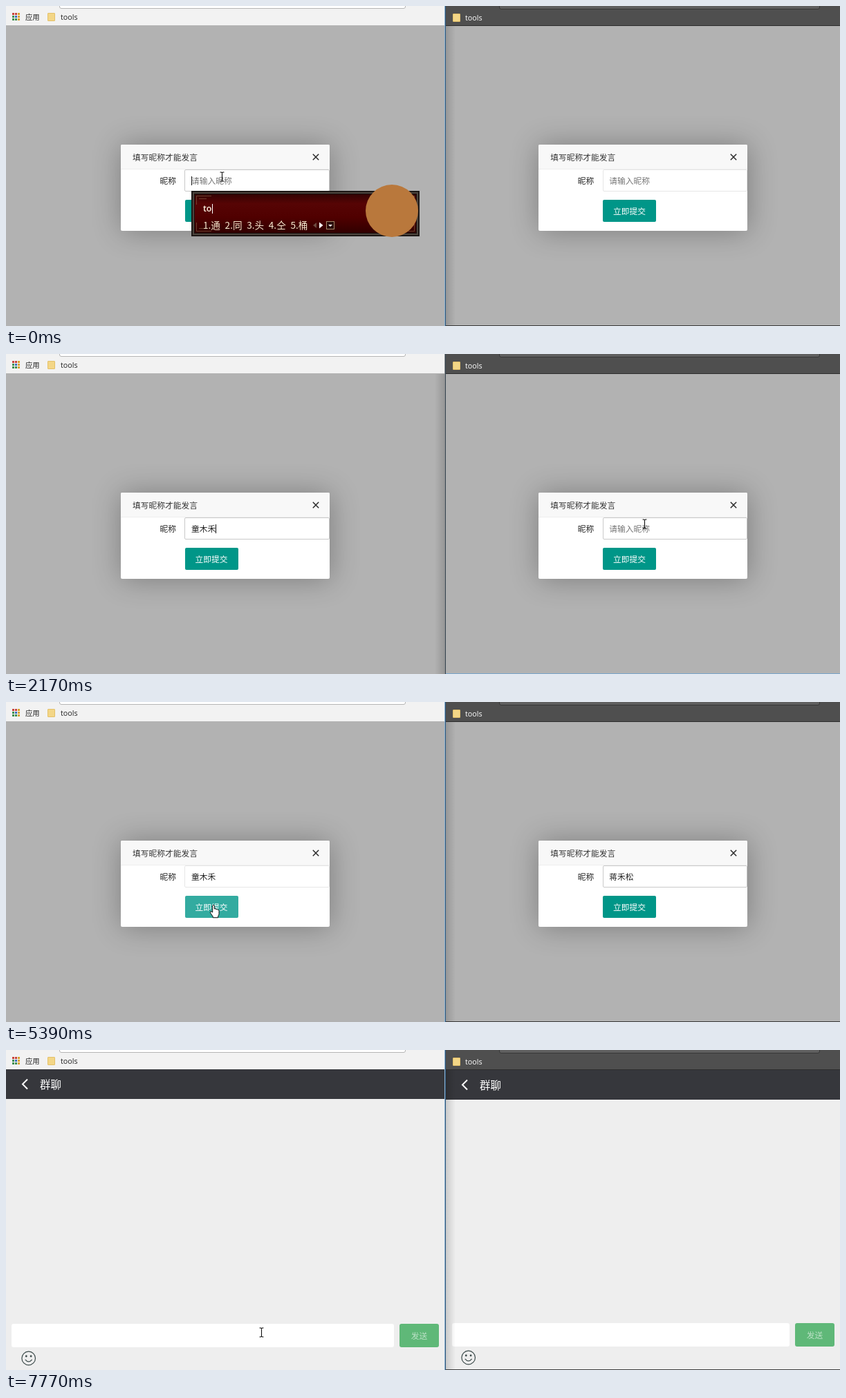
An HTML page that plays this animation: 1206 px wide and 464 px high, repeating every 8000 ms.

```html
<!DOCTYPE html>
<html lang="zh-CN">
<head>
<meta charset="utf-8">
<title>群聊</title>
<style>
html, body { margin: 0; width: 100%; height: 100%; overflow: hidden; }
#stage { position: relative; width: 1206px; height: 464px; overflow: hidden; background: #b2b2b2;
  font: 11.75px "Noto Sans CJK SC", "Noto Sans CJK", sans-serif; color: #333; white-space: nowrap; }
#stage div, #stage svg, .abs { position: absolute; box-sizing: border-box; }

.pane { top: 0; height: 464px; overflow: hidden; background: #b2b2b2; }
.pane.l { left: 0; width: 635px; }
.pane.r { left: 636px; width: 570px; }
.bar { left: 0; top: 0; width: 100%; height: 28px; background: #f2f2f2; color: #222; }
.r .bar { height: 29px; background: #4f4f4f; color: #fff; border-bottom: 1px solid #2e2e2e; }
.omni { left: 77px; top: -20px; width: 501px; height: 24px; background: #fff; border: 1px solid #b4b4b4; border-radius: 3px; }
.r .omni { width: 464px; height: 25px; background: #5f5f5f; border-color: #383838; }
.apps { left: 9px; top: 10px; }
.apps-label { left: 28px; top: 6px; font-size: 10.3px; line-height: 20px; }
.folder { left: 60px; top: 10px; width: 11px; height: 12px; background: #f3d687; border: 1px solid #e3c069; border-radius: 1px; }
.r .folder { left: 10px; top: 11px; }
.tools { left: 79px; top: 6px; font: 10.8px/20px "Open Sans", sans-serif; }
.r .tools { left: 28px; top: 7px; }

.dialog { top: 200.5px; width: 302px; height: 125px; background: #fff; border-radius: 2px;
  box-shadow: 1px 1px 42px rgba(0,0,0,.3); }
.l .dialog { left: 166px; }
.r .dialog { left: 134.3px; }
.title { left: 0; top: 0; width: 100%; height: 36px; padding-left: 17px; line-height: 35px;
  background: #f8f8f8; border-bottom: 1px solid #eee; border-radius: 2px 2px 0 0; }
.close { left: 277px; top: 13.5px; }
.label { left: 56.5px; top: 36px; line-height: 32px; color: #222; }
.field { left: 92.3px; top: 36px; width: 209.7px; height: 32px; padding-left: 8.7px; line-height: 30px;
  background: #fff; border: 1px solid #e6e6e6; border-radius: 2px; color: #222; }
.field.on { border-color: #c9c9c9; }
.hint { color: #757575; }
.caret { display: inline-block; width: 1px; height: 13px; margin-right: -1px; vertical-align: -2px; background: #111; }
.ok { left: 92.6px; top: 80.5px; width: 77px; height: 32px; line-height: 31px; text-align: center;
  background: #009688; color: #fff; border-radius: 2px; }

.chat { left: 0; top: 28px; width: 100%; height: 436px; background: #eee; }
.r .chat { top: 29px; }
.head { left: 0; top: 0; width: 100%; height: 42.5px; padding-left: 49px; background: #36373c; color: #fff;
  font-size: 15.5px; line-height: 42px; }
.back { left: 21px; top: 13px; }
.input { left: 8px; top: 369px; width: 553px; height: 34px; background: #fff; border-radius: 3px; }
.r .input { left: 9px; top: 367px; width: 488px; }
.input .caret { left: 5px; top: 10px; }
.send { left: 569px; top: 369px; width: 57px; height: 34px; line-height: 34px; text-align: center;
  background: #5fb878; color: rgba(255,255,255,.58); border-radius: 3px; }
.r .send { left: 505px; top: 367px; }
.smile { left: 22px; top: 408px; }
.r .smile { top: 406px; }

.edge { top: 0; height: 464px; }
#line { left: 634px; width: 2px; }
#shade { width: 14px; top: 29px; }
#base { left: 636px; top: 463px; width: 570px; height: 1px; }

#ime { top: 268px; width: max-content; height: 66px; padding: 0 122px 0 17px; color: #f8ecd2;
  background: linear-gradient(#260303, #560404 28%, #500000 58%, #2a0000);
  border-radius: 1px; box-shadow: inset 0 0 0 2px #1d1816, inset 0 0 0 4px #4d443d, inset 0 0 0 5px #17100e; }
#ime::before { content: ""; position: absolute; inset: 7px; opacity: .6;
  --h: linear-gradient(#8a6a4c, #8a6a4c) no-repeat;
  background: var(--h) 0 0/22px 1px, var(--h) 0 0/1px 13px, var(--h) 100% 0/22px 1px, var(--h) 100% 0/1px 13px,
    var(--h) 0 100%/22px 1px, var(--h) 0 100%/1px 13px, var(--h) 100% 100%/22px 1px, var(--h) 100% 100%/1px 13px,
    var(--h) 4px 4px/11px 1px, var(--h) 4px calc(100% - 4px)/11px 1px; }
#emblem { right: 2px; top: -9px; width: 76px; height: 76px; border-radius: 50%; background: #b9783c; }
#typed { left: 17px; top: 16px; font: 600 12.4px/20px "Open Sans", sans-serif; color: #fff6e4; }
#typed::after { content: ""; display: inline-block; width: 1px; height: 14px; margin-left: 1px; vertical-align: -3px; background: #fff; }
#stage #list { position: relative; display: flex; padding-top: 39px; font-size: 13.6px; line-height: 20px; }
#list span { margin-right: 6.7px; }
#stage #list svg { position: static; flex: none; margin-top: 4px; }
#pointer { left: 0; top: 0; overflow: visible; }
</style>
</head>
<body>
<div id="stage"></div>
<script>
const STEP = 70, LOOP = 8000;
const NAMES = ['童木禾', '蒋禾松'];
const stage = document.getElementById('stage');

const apps = () => {
  const colors = ['#c8433a', '#c8433a', '#d9a129', '#3f8f4f', '#3b6fc0', '#d9a129', '#3f8f4f', '#3f8f4f', '#d9a129'];
  const dots = colors.map((c, i) => `<rect x="${i % 3 * 4}" y="${(i / 3 | 0) * 4}" width="3" height="3" fill="${c}"/>`);
  return `<svg class="apps" width="11" height="11">${dots.join('')}</svg><div class="apps-label">应用</div>`;
};

const pane = side => `
<div class="pane ${side}">
  <div class="bar"><div class="omni"></div>${side === 'l' ? apps() : ''}
    <div class="folder"></div><div class="tools">tools</div></div>
  <div class="dialog">
    <div class="title">填写昵称才能发言</div>
    <svg class="close" width="10" height="10"><path d="M.8 .8 9.2 9.2M9.2 .8 .8 9.2" stroke="#2b2b2b" stroke-width="1.5"/></svg>
    <div class="label">昵称</div>
    <div class="field"><span class="value"></span><i class="caret"></i><span class="hint">请输入昵称</span></div>
    <div class="ok">立即提交</div>
  </div>
  <div class="chat">
    <div class="head">群聊</div>
    <svg class="back" width="12" height="17"><path d="M10 1.5 3 8.5 10 15.5" fill="none" stroke="#fff" stroke-width="2"/></svg>
    <div class="input"><i class="caret abs"></i></div>
    <div class="send">发送</div>
    <svg class="smile" width="22" height="22" fill="none" stroke="#3b4a4a" stroke-width="1.2">
      <circle cx="10.7" cy="11" r="9.8"/><path d="M5.8 12.8Q10.7 19 15.6 12.8"/>
      <circle cx="7.3" cy="8" r=".8" fill="#3b4a4a"/><circle cx="14.1" cy="8" r=".8" fill="#3b4a4a"/></svg>
  </div>
</div>`;

stage.innerHTML = pane('l') + pane('r') + `
<div id="shade" class="edge"></div><div id="line" class="edge"></div><div id="base"></div>
<div id="ime"><div id="emblem"></div><div id="typed"></div><div id="list"></div></div>
<svg id="pointer" width="20" height="22">
  <path id="beam" d="M-3 -6.5H-1L0 -5.5 1 -6.5H3M0 -5.5V5.5M-3 6.5H-1L0 5.5 1 6.5H3" fill="none" stroke="#111" stroke-width="1.1"/>
  <path id="arrow" d="M.5 .5V13L3.4 10.4 5.4 15 7.4 14.1 5.5 9.7H9.4Z" fill="#fff" stroke="#111"/>
  <path id="hand" d="M-1.3 11V1.2Q0 -.8 1.3 1.2V6Q3 5 3.9 6.7 5.6 5.9 6.2 7.4 7.8 6.9 8 8.7V13.5Q7.6 15.4 6.6 16.5V18.7H-.8V17L-4.6 11.6Q-4.8 9.2 -2.8 9.9Z"
    fill="#fff" stroke="#111"/>
</svg>`;

const $ = id => document.getElementById(id);
const show = (el, on) => { el.style.display = on ? '' : 'none'; };
const during = (t, ...spans) => spans.some(([a, b]) => t >= a && t < b);

const panes = [...document.querySelectorAll('.pane')].map(el => {
  const q = s => el.querySelector(s);
  return { dialog: q('.dialog'), field: q('.field'), value: q('.value'), caret: q('.field .caret'),
    hint: q('.hint'), ok: q('.ok'), chat: q('.chat'), chatCaret: q('.input .caret') };
});

// start time, pinyin, candidates; an empty entry closes the panel
const typing = [
  [0, 'to', '通 同 头 仝 桶'],
  [140, 'ton', '通 同 统 同年 通年'],
  [210, 'tong', '通 同 童 同年 通年'],
  [350, "tong'm", '童木 同门 通明 同名 童谣'],
  [560, "tong'mu", '童木 同幕 桐 同 通'],
  [770, "tong'mu'h", '童木禾 童木 同幕 桐木 通目'],
  [910, "tong'mu'he", '童木禾 童木 同幕 桐木 通目'],
  [1050],
  [2940, 'j', '就 及 将 接 今'],
  [3010, 'ji', '及 即 几 级 记'],
  [3150, 'jian', '见 间 件 建 减'],
  [3220, 'jiang', '蒋 将 江 讲 降'],
  [3430, "jiang'h", '蒋禾 江河 讲话 江湖 将会'],
  [3500, "jiang'he", '蒋禾 江河 将和 蒋和 讲和'],
  [3640, "jiang'he's", '蒋禾松 江河 将和 蒋禾 蒋和'],
  [3710, "jiang'he'so", '蒋禾松 江河 将和 蒋禾 蒋和'],
  [3850, "jiang'he'son", '蒋禾松 蒋和松 江河 蒋禾 蒋和'],
  [3990, "jiang'he'song", '蒋禾松 蒋和松 江河 蒋禾 蒋和'],
  [4130]
];

// time, x, y
const path = [
  [0, 312.5, 247.5], [1400, 312.5, 247.5], [1680, 600, 262], [1960, 1008, 296], [2030, 988, 258], [2100, 945, 252],
  [2170, 923.5, 246.5], [2310, 923.5, 246.5], [2380, 924.5, 245.5], [4550, 924.5, 245.5], [4900, 690, 262],
  [5250, 318, 290], [5320, 300, 294], [5460, 300, 294], [5600, 400, 300], [5950, 809, 303], [6160, 903, 295],
  [6300, 903, 295], [6650, 680, 350], [7070, 371.5, 411.5], [7350, 370.5, 411.5], [7420, 369.5, 409.5], [LOOP, 369.5, 409.5]
];

function pointerAt(t) {
  const i = path.findIndex(p => p[0] > t);
  const [a, b] = [path[i - 1], path[i]];
  const k = (t - a[0]) / (b[0] - a[0]);
  return [a[1] + (b[1] - a[1]) * k, a[2] + (b[2] - a[2]) * k];
}

const nav = `<svg width="33" height="14">
  <path d="M6 3V11L1 7Z" fill="#6d4a40"/><path d="M10 2.5V11.5L15.5 7Z" fill="#fff"/>
  <rect x="20.5" y="1.5" width="11" height="11" fill="#2a0a08" stroke="#a08768"/><path d="M23 6H29L26 9Z" fill="#fff"/></svg>`;
let entry;

function drawIme(t) {
  const now = typing.filter(e => e[0] <= t).pop();
  $('ime').style.left = (t < 1050 ? 268 : t < 3850 ? 872 : 798) + 'px';
  if (now === entry) return;
  entry = now;
  const [, pinyin, words] = now;
  show($('ime'), pinyin);
  if (!pinyin) return;
  $('typed').textContent = pinyin;
  $('list').innerHTML = words.split(' ').map((w, i) => `<span>${i + 1}.${w}</span>`).join('') + nav;
}

function drawEdge(leftActive) {
  $('line').style.background = leftActive
    ? 'linear-gradient(90deg, #8fb4d2 50%, #2d5478 50%)' : 'linear-gradient(90deg, #8f9294 50%, #35434d 50%)';
  $('shade').style.left = leftActive ? '636px' : '620px';
  $('shade').style.background = `linear-gradient(${leftActive ? 90 : 270}deg, rgba(0,0,0,.15), transparent)`;
  $('base').style.background = leftActive ? '#3a3a3a' : '#7aa6cc';
}

function render(t) {
  const [x, y] = pointerAt(t);
  const chatting = [t >= 5460, t >= 6300];
  const named = [t >= 1050, t >= 4130];
  const focus = [t < 2240, during(t, [2240, 5460])];
  const carets = [
    during(t, [0, 350], [910, 1540], [2030, 2240]),
    during(t, [2240, 2660], [3150, 3640], [4130, 4620], [5110, 5320])
  ];
  let shape = 'arrow';

  panes.forEach((p, i) => {
    const dx = x - 604.3 * i;
    const inside = (l, tp, r, b) => dx >= l && dx < r && y >= tp && y < b;
    const onField = !chatting[i] && inside(258, 237, 468, 269);
    const onOk = !chatting[i] && inside(258, 281, 336, 313);
    if (onField) shape = 'beam';
    if (onOk) shape = 'hand';
    show(p.dialog, !chatting[i]);
    show(p.chat, chatting[i]);
    p.value.textContent = named[i] ? NAMES[i] : '';
    show(p.hint, !named[i]);
    show(p.caret, carets[i]);
    p.field.classList.toggle('on', focus[i] || onField);
    p.ok.style.background = onOk ? '#33aba0' : '#009688';
    show(p.chatCaret, i === 0 && during(t, [7210, 7770]));
  });
  if (chatting[0] && x > 8 && x < 561 && y > 397 && y < 431) shape = 'beam';

  drawEdge(!during(t, [2100, 5320], [6300, 7140]));
  drawIme(t);
  ['beam', 'arrow', 'hand'].forEach(id => show($(id), id === shape));
  $('pointer').style.transform = `translate(${Math.round(x * 2) / 2}px, ${Math.round(y * 2) / 2}px)`;
}

function tick() {
  const t = performance.now() % LOOP;
  render(Math.floor(t / STEP) * STEP);
  requestAnimationFrame(tick);
}
tick();
</script>
</body>
</html>
```
